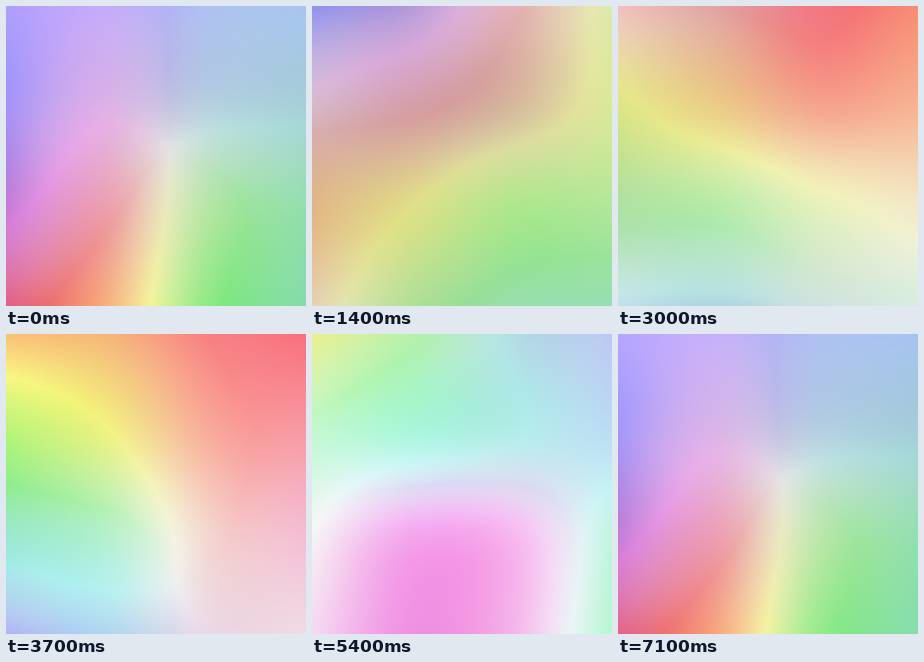
An HTML page with a canvas for the animation above (7200 ms loop, 300x300 px).

```html
<!DOCTYPE html>
<html lang="en">
<head>
<meta charset="utf-8">
<title>Drifting colour field</title>
<style>
  html, body { margin: 0; width: 100%; height: 100%; overflow: hidden; }
  canvas { display: block; width: 300px; height: 300px; }
</style>
</head>
<body>
<canvas id="stage" width="300" height="300"></canvas>
<script>
const SIZE = 300, LOOP = 7200, STEP = 100, N = 4;
const ctx = document.getElementById('stage').getContext('2d');
const image = ctx.createImageData(SIZE, SIZE);

// Each pose is a 4 x 4 mesh of control colours, blended through space and time.
const poses = [
  [0, `b09eff c4abfb afc0f2 a6c6f0
       a591f8 dcb0e6 b8cfe0 a5cfd8
       c27bd8 eba0b0 b9e6a8 92deb0
       e25e86 f7b07c 92ea84 84dbac`],
  [800, `a5a8f8 c6acee dcd9e2 b0e2c0
         b0a4e0 cfa8c8 c8c8b4 b2e0a8
         e68f96 dfc48e b4e492 a4dea4
         f0807c c4f07c 8ee292 92d8ae`],
  [2100, `9a92e4 b494cc e8808e f2c880
          d4a88e e2a08c eca888 f2dc80
          dadb7e cae48c b8ea94 c4f094
          acdcae b2d2c0 a2dcc4 9ee8bc`],
  [3700, `fac074 f6b478 f88080 f8707e
          b4f478 ecf284 f8b09c f89aa8
          9ae8cc b4f0cc f4d8d0 f4bcd4
          b0b4f4 b0d4f0 ead8e8 f0dce4`],
  [4400, `d4f074 ecf07c f0c888 ecb0b4
          a4fa94 b8fa8c f4d4a8 f4bccc
          92eee8 c0f4dc f4b8ec f8ccdc
          a0c4fc d0d8f8 f4b8f0 faeed8`],
  [5400, `e8f08c b8f0ac b4dce4 bcc8f4
          c4f8d0 acf6dc b4ece8 bcdcf4
          f6f4f4 f4a8ec f6b8ee c0f4e0
          f6d8f4 f090e0 f4b4e8 b4f6d0`]
].map(([time, colors]) => ({ time, mesh: colors.split(/\s+/).flatMap(toField) }));

// Hue and saturation become a vector, so blends between opposite hues pass through white.
function toField(hex) {
  const [r, g, b] = [0, 2, 4].map(i => parseInt(hex.slice(i, i + 2), 16) / 255);
  const max = Math.max(r, g, b), sat = 1 - Math.min(r, g, b) / max;
  const hue = Math.atan2(Math.sqrt(3) * (g - b), 2 * r - g - b);
  return [sat * Math.cos(hue), sat * Math.sin(hue), max];
}

function hermite(a, b, slopeA, slopeB, u) {
  const v = 1 - u;
  return a * (1 + 2 * u) * v * v + slopeA * u * v * v
       + b * u * u * (3 - 2 * u) - slopeB * u * u * v;
}

// Weights of the four control lines for every pixel position.
const weights = Array.from({ length: SIZE }, (_, p) => {
  const x = (p + 0.5) / SIZE * (N - 1), i = Math.floor(x);
  return Array.from({ length: N }, (_, k) => {
    const at = j => +(j === k);
    const slope = j => j === 0 ? at(1) - at(0)
      : j === N - 1 ? at(j) - at(j - 1)
      : (at(j + 1) - at(j - 1)) / 2;
    return hermite(at(i), at(i + 1), slope(i), slope(i + 1), x - i);
  });
});

function poseAt(i) {
  const n = poses.length, turn = Math.floor(i / n), pose = poses[i - turn * n];
  return { time: pose.time + turn * LOOP, mesh: pose.mesh };
}

function meshAt(t) {
  const i = poses.findLastIndex(p => p.time <= t);
  const [p, a, b, q] = [-1, 0, 1, 2].map(d => poseAt(i + d));
  const span = b.time - a.time;
  return a.mesh.map((value, k) => hermite(value, b.mesh[k],
    (b.mesh[k] - p.mesh[k]) * span / (b.time - p.time),
    (q.mesh[k] - value) * span / (q.time - a.time),
    (t - a.time) / span));
}

function draw(t) {
  const mesh = meshAt(t), row = new Float64Array(N * 3);
  let out = 0;
  for (let y = 0; y < SIZE; y++) {
    const wy = weights[y];
    for (let k = 0; k < row.length; k++) {
      row[k] = 0;
      for (let j = 0; j < N; j++) row[k] += wy[j] * mesh[j * N * 3 + k];
    }
    for (let x = 0; x < SIZE; x++) {
      const w = weights[x];
      const mix = c => w[0] * row[c] + w[1] * row[c + 3] + w[2] * row[c + 6] + w[3] * row[c + 9];
      const zx = mix(0), zy = mix(1), value = Math.min(1, mix(2)) * 255;
      const sat = Math.min(1, Math.sqrt(zx * zx + zy * zy));
      const hue = Math.atan2(zy, zx) * 3 / Math.PI + 6;
      for (let n = 5; n > 0; n -= 2) {
        const k = (n + hue) % 6;
        image.data[out++] = value * (1 - sat * Math.max(0, Math.min(k, 4 - k, 1)));
      }
      image.data[out++] = 255;
    }
  }
  ctx.putImageData(image, 0, 0);
}

let shown = -1;
function tick() {
  const t = Math.floor(performance.now() % LOOP / STEP) * STEP;
  if (t !== shown) draw(shown = t);
  requestAnimationFrame(tick);
}
tick();
</script>
</body>
</html>
```
